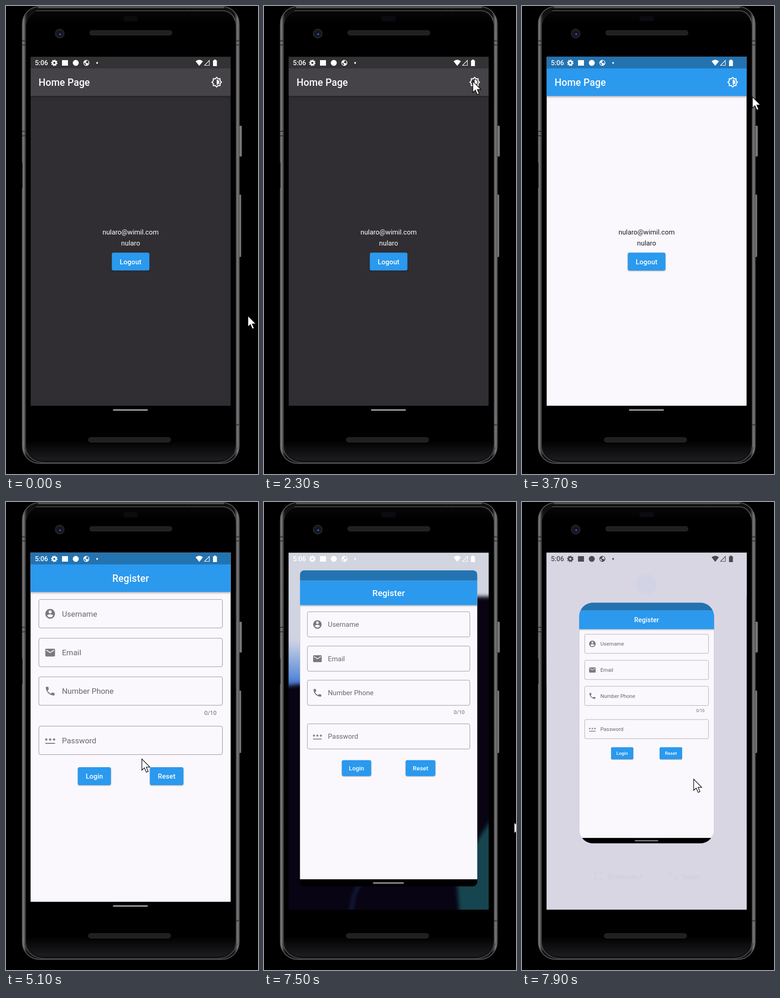
An HTML page for the animation above (8 s loop, 549x1020 px).

```html
<!DOCTYPE html>
<html lang="en">
<head>
<meta charset="utf-8">
<title>Theme switch and logout</title>
<style>
  html, body { margin: 0; width: 100%; height: 100%; overflow: hidden; background: #000; }
  svg { display: block; width: 100%; height: 100%; overflow: hidden; }
  text { font: 14.8px Roboto, sans-serif; }
  .title { font-size: 21.2px; font-weight: 500; fill: #fff; letter-spacing: .15px; }
  .label { font-size: 16.9px; fill: #69676b; }
  .count { font-size: 12.7px; fill: #69676b; }
  .mid { text-anchor: middle; }
  .button rect { fill: #2a99ee; filter: drop-shadow(0 1.5px 1px #0006); }
  .button text { fill: #fff; font-weight: 500; text-anchor: middle; letter-spacing: .15px; }
  .bar { fill: #2b99ee; filter: drop-shadow(0 2px 2px #0005); }
  .field { fill: none; stroke: #959397; stroke-width: 1.1; }
  .icon { fill: #7b797d; }
  #home { --light: 0%; }
  #home .page { fill: color-mix(in srgb, #faf8fd var(--light), #302e32); }
  #home .bar { fill: color-mix(in srgb, #2b99ee var(--light), #454347); }
  #home .strip { fill: color-mix(in srgb, #2373b1 var(--light), #333235); }
  #home .info { fill: color-mix(in srgb, #1d1c1f var(--light), #fff); text-anchor: middle; }
</style>
</head>
<body>
<svg viewBox="0 0 549 1020" preserveAspectRatio="none">
  <defs>
    <linearGradient id="rim">
      <stop offset="0" stop-color="#5c5c5e"/>
      <stop offset=".005" stop-color="#7c7c7f"/>
      <stop offset=".011" stop-color="#555557"/>
      <stop offset=".016" stop-color="#29292b"/>
      <stop offset=".024" stop-color="#111112"/>
      <stop offset=".976" stop-color="#111112"/>
      <stop offset=".984" stop-color="#39393b"/>
      <stop offset=".992" stop-color="#7a7a7d"/>
      <stop offset="1" stop-color="#545456"/>
    </linearGradient>
    <linearGradient id="face" x2="0" y2="1">
      <stop offset="0" stop-color="#08080a"/>
      <stop offset=".03" stop-color="#000"/>
      <stop offset=".955" stop-color="#000"/>
      <stop offset="1" stop-color="#1d1c20"/>
    </linearGradient>
    <linearGradient id="key">
      <stop offset="0" stop-color="#333"/>
      <stop offset=".6" stop-color="#8a8a8c"/>
      <stop offset="1" stop-color="#505052"/>
    </linearGradient>
    <linearGradient id="sky" x2="0" y2="1">
      <stop offset="0" stop-color="#d3d6e0"/>
      <stop offset=".68" stop-color="#cfd3e2"/>
      <stop offset=".94" stop-color="#5a8cdb"/>
      <stop offset="1" stop-color="#3a62ac"/>
    </linearGradient>
    <filter id="soft"><feGaussianBlur stdDeviation="4"/></filter>
    <clipPath id="screen"><rect x="53.5" y="110.5" width="436" height="778"/></clipPath>
    <clipPath id="window"><rect id="corners" x="53.5" y="110.5" width="436" height="778"/></clipPath>
  </defs>

  <!-- Phone -->
  <rect width="549" height="1020"/>
  <rect x="507" y="261" width="7" height="67" rx="2" fill="url(#key)"/>
  <rect x="507" y="411" width="5.5" height="136" rx="2" fill="url(#key)"/>
  <rect x="35.5" y="1" width="472.5" height="996" rx="38" fill="url(#rim)" stroke="#5e5e60" stroke-width="1.5"/>
  <path d="M35 76h7M35 85h7M35 273h7M35 283h7M501 76h7M501 85h7M501 913h7M397 1v6M410 1v6" stroke="#222" stroke-width="1.5"/>
  <path d="M35 341v56" stroke="#111" stroke-width="2"/>
  <path d="M70 3H475" stroke="#565658" stroke-width="3"/>
  <rect x="43.5" y="9.500" width="457" height="981" rx="36" fill="url(#face)" stroke="#151516"/>
  <path d="M66 10.500H474Q494 12 499 32" fill="none" stroke="#747477" stroke-width="1.2"/>
  <path d="M40 962Q50 993 82 995.500H462Q494 993 504 962" fill="none" stroke="#4a494c" stroke-width="2"/>
  <rect x="256" y="22" width="31" height="11" rx="4" fill="#0c0b10"/>
  <g fill="#221f21" stroke="#2f2d2f">
    <rect x="182.5" y="53.500" width="179" height="10" rx="4.5"/>
    <rect x="179.5" y="940.500" width="179" height="10" rx="4.5"/>
  </g>
  <circle cx="117" cy="60" r="9.5" fill="#17171b" stroke="#303034" stroke-width="1.5"/>
  <circle cx="117.5" cy="60.500" r="5" fill="#10142a"/>
  <circle cx="118" cy="61.500" r="2" fill="#3d5fae"/>

  <g clip-path="url(#screen)">
    <!-- Launcher behind the app -->
    <g id="launcher">
      <rect x="53" y="110" width="437" height="779" fill="#090413"/>
      <g filter="url(#soft)">
        <path d="M40 90H505V206H440L250 330 90 396 40 402Z" fill="url(#sky)"/>
        <path d="M505 680Q450 750 420 830L426 905H505Z" fill="#17444f"/>
        <path d="M212 830Q192 850 190 900" fill="none" stroke="#122149" stroke-width="6"/>
      </g>
      <g id="overview">
        <rect x="53" y="110" width="437" height="779" fill="#d9d6e4"/>
        <circle cx="271" cy="179" r="23" fill="#d2d4e5"/>
        <g fill="#cfccda">
          <text x="187" y="822">Screenshot</text>
          <text x="348" y="822">Select</text>
          <path d="M159 814v-5h5M168 809h5v5M173 819v5h-5M164 824h-5v-5M321 814v-5h5M336 819v5h-5" fill="none" stroke="#cfccda" stroke-width="1.5"/>
        </g>
      </g>
    </g>

    <!-- App window -->
    <g id="app">
      <g clip-path="url(#window)">
        <rect x="53" y="110" width="437" height="779"/>
        <g id="home">
          <rect class="page" x="53" y="110" width="437" height="761.5"/>
          <rect class="bar" x="53" y="136" width="437" height="60"/>
          <rect class="strip" x="53" y="110" width="437" height="26"/>
          <text class="title" x="71" y="174">Home Page</text>
          <path transform="translate(446.3 153.3) scale(1.058)" fill="#fff" d="M20 8.69V4h-4.69L12 .69 8.69 4H4v4.69L.69 12 4 15.31V20h4.69L12 23.31 15.31 20H20v-4.69L23.31 12ZM18 14.48V18h-3.52L12 20.48 9.52 18H6v-3.52L3.52 12 6 9.52V6h3.52L12 3.52 14.48 6H18v3.52L20.48 12ZM12 6.5v11a5.5 5.5 0 0 0 0-11Z" fill-rule="evenodd"/>
          <text class="info" x="271.5" y="498">nularo@wimil.com</text>
          <text class="info" x="271.5" y="522">nularo</text>
          <g class="button">
            <rect x="230.5" y="537.5" width="82" height="39" rx="4"/>
            <text x="271.5" y="562.5">Logout</text>
          </g>
        </g>
        <g id="register">
          <rect x="53" y="110" width="437" height="761.5" fill="#faf8fd"/>
          <rect class="bar" x="53" y="136" width="437" height="60"/>
          <rect x="53" y="110" width="437" height="26" fill="#2373b1"/>
          <text class="title mid" x="271.5" y="174">Register</text>
          <g id="fields"></g>
          <text class="count" x="432" y="464">0/10</text>
          <g class="button">
            <rect x="156.5" y="578" width="72" height="39" rx="4"/>
            <text x="192.5" y="603">Login</text>
            <rect x="313.5" y="578" width="73" height="39" rx="4"/>
            <text x="350" y="603">Reset</text>
          </g>
        </g>
        <rect x="53" y="871.5" width="437" height="17.5"/>
        <rect x="233" y="879.5" width="76" height="2" rx="1" fill="#eee"/>
      </g>
    </g>

    <!-- System status bar -->
    <g id="status" color="#fff" fill="currentColor">
      <text x="63" y="129.300" style="font-size:14.5px;font-weight:500">5:06</text>
      <g fill="none" stroke="currentColor">
        <circle cx="105.3" cy="124" r="3.8" stroke-width="3"/>
        <circle cx="105.3" cy="124" r="5.8" stroke-width="2.4" pathLength="16" stroke-dasharray="1.2 .8"/>
        <path d="M432.5 129.5H443V118.5Z" stroke-width="1.2"/>
      </g>
      <rect x="122" y="118" width="13" height="12"/>
      <circle cx="152" cy="124" r="6.5"/>
      <path fill-rule="evenodd" d="M168.5 124a6.5 6.5 0 1 0 13 0a6.5 6.5 0 1 0-13 0ZM170 123l4 3v3q-4-1-4-6ZM175 119h3l2 4-1 3-2-2h-3v-2l2-1Z"/>
      <circle cx="198.5" cy="124" r="1.9"/>
      <path d="M413 120.5Q421 114 429 120.5L421 130.5Z"/>
      <path d="M451 118.5h2.5v-1.7h3.5v1.7h2.5V131h-8.5Z"/>
    </g>
  </g>

  <path id="cursor" d="M0 0V24.5L5.5 19.3 9.7 29 13.7 27.2 9.6 17.9H17.5Z" fill="#fff" stroke="#000" stroke-width="1.3"/>
</svg>

<script>
const LOOP = 8000, STEP = 100;
const byId = id => document.getElementById(id);

const asterisk = x => `M${x - 2.6} 10h5.2M${x - 1.3} 7.8l2.6 4.4M${x + 1.3} 7.8l-2.6 4.4`;
const icons = {
  account: '<path fill-rule="evenodd" d="M12 2a10 10 0 1 0 0 20a10 10 0 1 0 0-20ZM12 5a3 3 0 1 1 0 6a3 3 0 1 1 0-6ZM12 19.2c-2.5 0-4.71-1.28-6-3.22 .03-1.99 4-3.08 6-3.08s5.97 1.09 6 3.08c-1.29 1.94-3.5 3.22-6 3.22Z"/>',
  mail: '<path d="M20 4H4a2 2 0 0 0-2 2V18a2 2 0 0 0 2 2H20a2 2 0 0 0 2-2V6a2 2 0 0 0-2-2ZM20 8l-8 5-8-5V6l8 5 8-5Z"/>',
  phone: '<path d="M6.62 10.79a15.1 15.1 0 0 0 6.59 6.59l2.2-2.2a1 1 0 0 1 1.02-.24 11.4 11.4 0 0 0 3.57 .57 1 1 0 0 1 1 1V20a1 1 0 0 1-1 1A17 17 0 0 1 3 4a1 1 0 0 1 1-1h3.5a1 1 0 0 1 1 1 11.4 11.4 0 0 0 .57 3.57 1 1 0 0 1-.25 1.02Z"/>',
  password: `<path d="M2 17h20v2H2Z"/><path fill="none" stroke="#7b797d" stroke-width="1.4" d="${[4, 12, 20].map(asterisk).join('')}"/>`
};

const field = (top, icon, label) => `
  <rect class="field" x="71.5" y="${top + .5}" width="400" height="62" rx="4"/>
  <g class="icon" transform="translate(83.5 ${top + 19}) scale(1.058)">${icons[icon]}</g>
  <text class="label" x="122" y="${top + 37.5}">${label}</text>`;

byId('fields').innerHTML =
  field(212, 'account', 'Username') +
  field(296.5, 'mail', 'Email') +
  field(380.5, 'phone', 'Number Phone') +
  field(488, 'password', 'Password');

// Tracks are lists of [time, ...values], joined by straight lines.
const pointerTrack = [
  [0, 527, 675], [500, 527, 675], [900, 512, 540], [1500, 483, 215], [1900, 477, 185],
  [2300, 455, 164], [3500, 455, 164], [3600, 468, 175], [3700, 502, 198], [3800, 498, 225],
  [4400, 272, 556], [5000, 275, 558], [5100, 296, 560], [5400, 440, 570], [5700, 570, 585],
  [7400, 590, 735], [7500, 545, 698], [7900, 374, 604]
];
const windowTrack = [  // scale, corner radius on stage
  [7300, 1, 0], [7500, .885, 9], [7700, .76, 22], [7900, .674, 30]
];

const clamp = v => Math.min(1, Math.max(0, v));
const progress = (t, start, length) => clamp((t - start) / length);
const easeOut = p => 1 - (1 - p) ** 3;

function sample(track, t) {
  const next = track.findIndex(key => key[0] > t);
  if (next < 0) return track[track.length - 1].slice(1);
  if (next === 0) return track[0].slice(1);
  const a = track[next - 1], b = track[next];
  const p = (t - a[0]) / (b[0] - a[0]);
  return a.slice(1).map((v, i) => v + (b[i + 1] - v) * p);
}

const scaleAbout = (x, y, s) => `translate(${x} ${y}) scale(${s}) translate(${-x} ${-y})`;

function draw(t) {
  const [x, y] = sample(pointerTrack, t);
  byId('cursor').setAttribute('transform', `translate(${x} ${y})`);

  byId('home').style.setProperty('--light', progress(t, 3100, 200) * 100 + '%');

  const opened = progress(t, 4700, 300);
  byId('register').setAttribute('opacity', clamp(opened * 2));
  byId('register').setAttribute('transform', scaleAbout(271.5, 491, .85 + .15 * easeOut(opened)));

  const [scale, radius] = sample(windowTrack, t);
  byId('app').setAttribute('transform',
    `translate(0 ${-55 * (1 - scale)}) ` + scaleAbout(271.5, 499.5, scale));
  byId('corners').setAttribute('rx', radius / scale);

  const overview = progress(t, 7500, 350);
  byId('launcher').setAttribute('visibility', t > 7300 ? 'visible' : 'hidden');
  byId('overview').setAttribute('opacity', overview);
  byId('status').setAttribute('color', overview > .5 ? '#4b4a4e' : '#fff');
}

function tick() {
  draw(Math.floor(performance.now() % LOOP / STEP) * STEP);
  requestAnimationFrame(tick);
}
tick();
</script>
</body>
</html>
```
